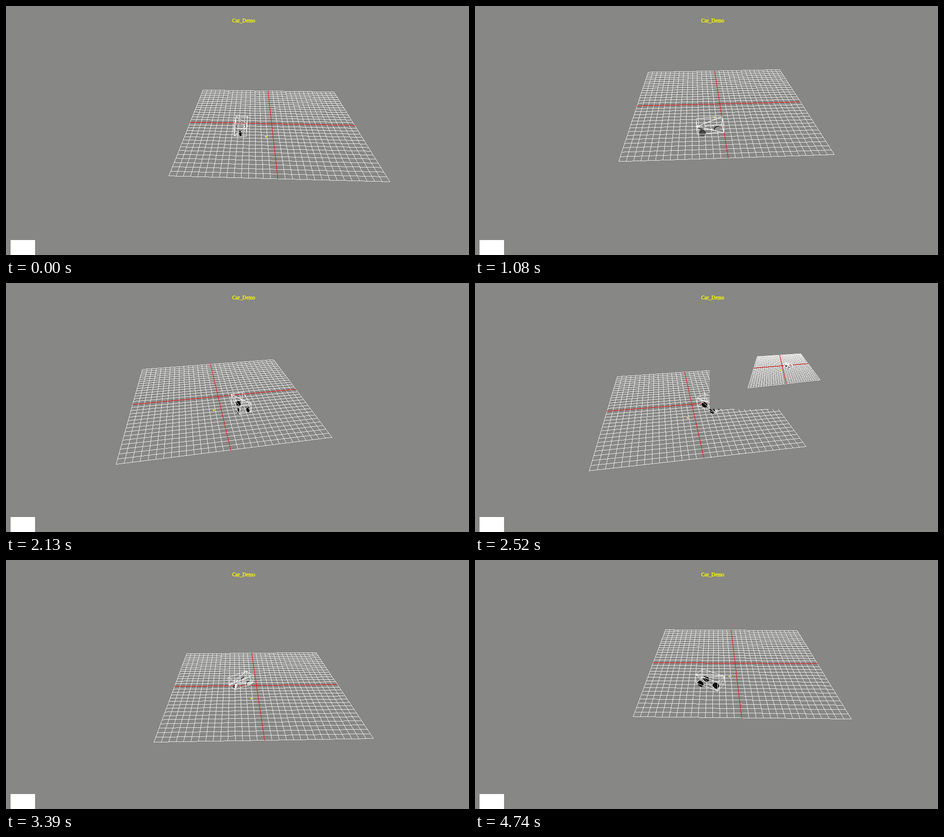
Recreate the animation shown at these times as an HTML page with a canvas. Size 1020x549 px, loop 4770 ms.

```html
<!DOCTYPE html>
<html>
<head>
<meta charset="utf-8">
<title>Car demo</title>
<style>
html, body { margin: 0; width: 100%; height: 100%; overflow: hidden; background: #878785; }
canvas { display: block; }
</style>
</head>
<body>
<canvas id="stage" width="1020" height="549"></canvas>
<script>
const ctx = document.getElementById('stage').getContext('2d');
const LOOP = 4770, STEP = 30;
const GREY = '#878785', WHITE = '#fff', WIRE = '#f2f2f2', RED = '#f00', YELLOW = '#ff0';
const FOCAL = 600, MID = { x: 517, y: 278 };
const EYE = { x: -3.93, y: 25, z: 43.35 };
const TRACK = { x: -1.31, z: 4.55 };
const HALF = 15;
const RAD = Math.PI / 180;

// time, angle on the track in degrees, radius
const LAP = [
  [0, 197.8, 4.41], [1080, 102.3, 4.35], [1770, 37.1, 4.48], [2520, -27.3, 4.82],
  [3390, -109.9, 4.59], [4020, -167.2, 4.44], [4740, -222.6, 4.32]
];
const INSET = { from: 2400, to: 2730, scale: 1 / 3, x: 517, y: 93, w: 345, h: 185 };

function carAt(t) {
  let i = 0;
  while (i < LAP.length - 2 && t >= LAP[i + 1][0]) i++;
  const a = LAP[i], b = LAP[i + 1];
  const k = (t - a[0]) / (b[0] - a[0]);
  const ang = (a[1] + (b[1] - a[1]) * k) * RAD;
  const r = a[2] + (b[2] - a[2]) * k;
  return {
    x: TRACK.x + r * Math.cos(ang),
    z: TRACK.z + r * Math.sin(ang),
    head: ang - 106 * RAD
  };
}

// Fixed camera that turns to keep the car in the middle.
function makeView(car, scale, ox, oy) {
  const r = car.x - EYE.x, w = EYE.z - car.z;
  const dist = Math.hypot(r, w), len = Math.hypot(dist, EYE.y);
  const sy = r / dist, cy = w / dist, sp = EYE.y / len, cp = dist / len;
  return (x, y, z) => {
    const dx = x - EYE.x, dz = EYE.z - z, dy = EYE.y - y;
    const side = dx * cy - dz * sy, fwd = dx * sy + dz * cy;
    const f = FOCAL / (fwd * cp + dy * sp);
    return [
      ox + scale * (MID.x + f * side),
      oy + scale * (MID.y + f * (dy * cp - fwd * sp))
    ];
  };
}

// Hard-edged one pixel line, drawn as runs.
function line(p, q, color) {
  ctx.fillStyle = color;
  const steep = Math.abs(q[1] - p[1]) > Math.abs(q[0] - p[0]);
  const m = steep ? 1 : 0;
  if (p[m] > q[m]) [p, q] = [q, p];
  const start = Math.round(p[m]), end = Math.round(q[m]);
  const slope = (q[1 - m] - p[1 - m]) / (q[m] - p[m] || 1);
  const level = i => Math.round(p[1 - m] + (i - p[m]) * slope);
  let from = start, cur = level(start);
  for (let i = start + 1; i <= end + 1; i++) {
    const next = level(i);
    if (next === cur && i <= end) continue;
    if (steep) ctx.fillRect(cur, from, 1, i - from);
    else ctx.fillRect(from, cur, i - from, 1);
    from = i;
    cur = next;
  }
}

function drawGrid(view) {
  const across = (z, c) => line(view(-HALF, 0, z), view(HALF, 0, z), c);
  const along = (x, c) => line(view(x, 0, -HALF), view(x, 0, HALF), c);
  for (let i = -HALF; i <= HALF; i++) {
    across(i, WIRE);
    along(i, WIRE);
  }
  across(0, RED);
  along(0, RED);
}

function drawDot(view) {
  const p = view(-1.24, 0, 4.47);
  ctx.fillStyle = YELLOW;
  ctx.fillRect(Math.round(p[0]) - 1, Math.round(p[1]) - 1, 3, 3);
}

function drawWheel(view, x, z, head) {
  const R = 0.5, c = Math.cos(head), s = Math.sin(head);
  const toEye = -s * (EYE.x - x) + c * (EYE.z - z) > 0 ? 1 : -1;
  const nx = -s * toEye, nz = c * toEye;
  const lit = Math.max(0, Math.cos(Math.atan2(nz, nx) - 15 * RAD));
  const v = Math.round(235 * lit);
  for (const off of [-0.08, 0, 0.08]) {
    ctx.beginPath();
    for (let i = 0; i < 16; i++) {
      const a = i * Math.PI / 8, u = R * Math.cos(a);
      ctx.lineTo(...view(x + c * u + nx * off, R + R * Math.sin(a), z + s * u + nz * off));
    }
    ctx.fillStyle = off > 0 ? `rgb(${v},${v},${v})` : '#000';
    ctx.fill();
  }
}

function drawCar(view, car) {
  const c = Math.cos(car.head), s = Math.sin(car.head);
  const place = (u, w) => [car.x + c * u - s * w, car.z + s * u + c * w];
  const wheel = (u, w, steer) => drawWheel(view, ...place(u, w), car.head + steer);
  const wheels = [[-1.2, -0.83, 0], [-1.2, 0.83, 0], [1.15, 0, -0.35]];
  wheels.sort((a, b) => place(a[0], a[1])[1] - place(b[0], b[1])[1]);
  wheels.forEach(w => wheel(...w));

  // Corner bits: 1 = front, 2 = top, 4 = right side
  const corner = n => {
    const [x, z] = place(n & 1 ? 2.03 : -2.03, n & 4 ? 1.02 : -1.02);
    return view(x, n & 2 ? 2.07 : 0.5, z);
  };
  const edge = (a, b) => line(corner(a), corner(b), WIRE);
  for (let n = 0; n < 8; n++)
    for (const bit of [1, 2, 4]) if (!(n & bit)) edge(n, n | bit);
  [[0, 3], [5, 6], [0, 6], [3, 5], [0, 5], [3, 6]].forEach(d => edge(...d));
}

function drawScene(car, scale, ox, oy) {
  const view = makeView(car, scale, ox, oy);
  drawGrid(view);
  drawDot(view);
  drawCar(view, car);
}

function drawTitle() {
  ctx.fillStyle = ctx.strokeStyle = YELLOW;
  ctx.lineWidth = 0.4;
  ctx.font = '11.6px "Liberation Serif", "Times New Roman", serif';
  ctx.fillText('Car_Demo', 498.3, 36);
  ctx.strokeText('Car_Demo', 498.3, 36);
}

function draw(t) {
  const car = carAt(t);
  ctx.fillStyle = GREY;
  ctx.fillRect(0, 0, 1020, 549);
  drawScene(car, 1, 0, 0);

  if (t >= INSET.from && t < INSET.to) {
    ctx.save();
    ctx.beginPath();
    ctx.rect(INSET.x, INSET.y, INSET.w, INSET.h);
    ctx.clip();
    ctx.fillStyle = GREY;
    ctx.fillRect(INSET.x, INSET.y, INSET.w, INSET.h);
    drawScene(car, INSET.scale, INSET.x, INSET.y);
    ctx.restore();
  }

  drawTitle();
  ctx.fillStyle = WHITE;
  ctx.fillRect(10, 516, 54, 54);
}

let shown = -1;
function tick() {
  const t = Math.floor(performance.now() % LOOP / STEP) * STEP;
  if (t !== shown) draw(shown = t);
  requestAnimationFrame(tick);
}
tick();
</script>
</body>
</html>
```
